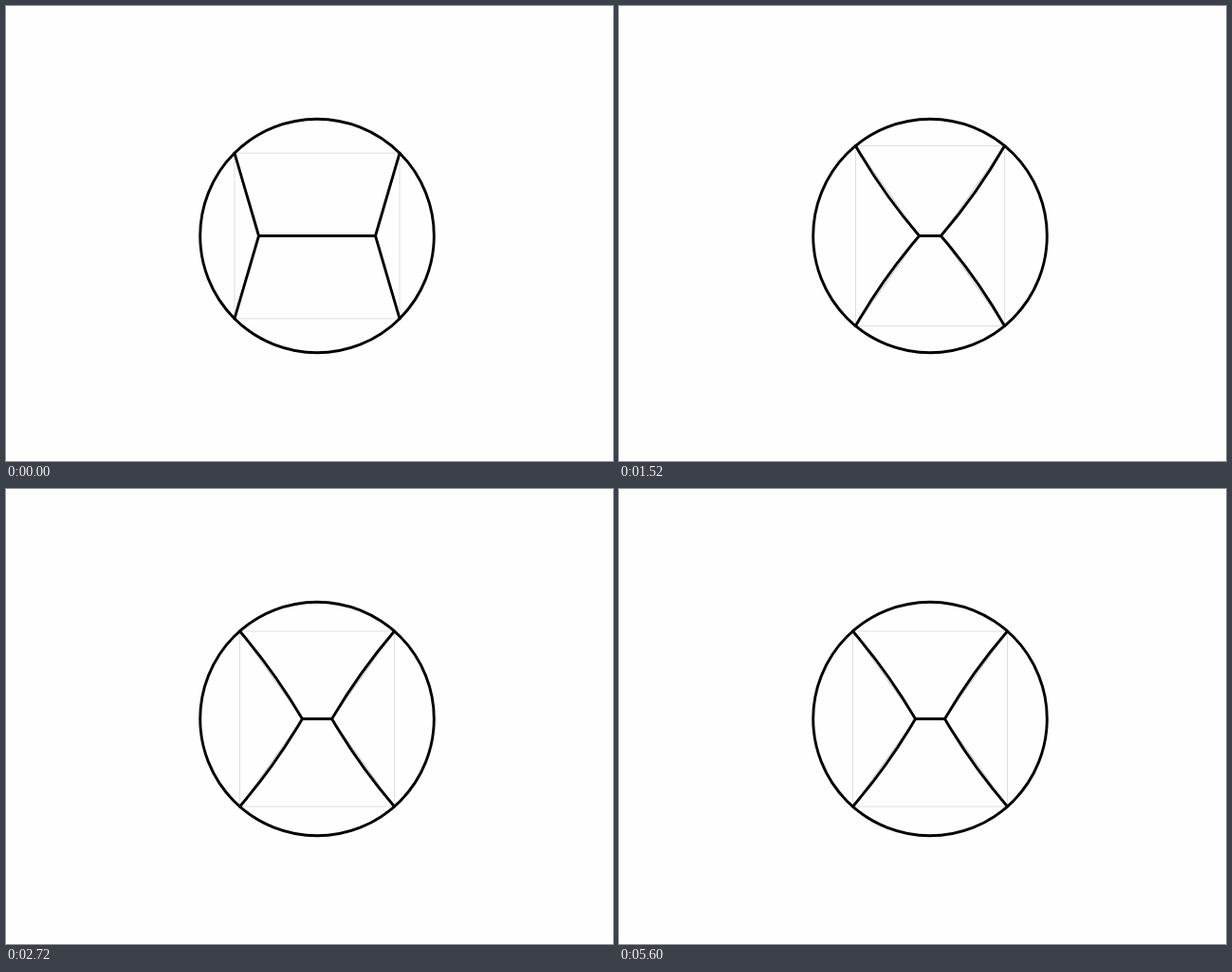
An HTML page for the animation above (10000 ms loop, 640x480 px).

```html
<!DOCTYPE html>
<html lang="en">
<head>
<meta charset="utf-8">
<title>Relaxing foam</title>
<style>
  html, body { margin: 0; width: 100%; height: 100%; overflow: hidden; background: #fefefe; }
  svg { display: block; width: 640px; height: 480px; }
  path, circle { fill: none; stroke: #000; stroke-width: 2.9; stroke-linecap: round; stroke-linejoin: round; }
  .guide { stroke-width: 1; stroke-opacity: .13; stroke-linecap: butt; }
  #chords { stroke-opacity: .24; }
</style>
</head>
<body>
<svg viewBox="0 0 640 480">
  <g transform="translate(328 242.5)">
    <path id="box" class="guide"/>
    <path id="chords" class="guide"/>
    <circle r="123.3"/>
    <path id="films"/>
  </g>
</svg>
<script>
const { sin, cos, abs, exp, max, floor, PI } = Math;
const RADIUS = 123.3, LOOP = 10000, START = 1000, STEP = 40, DAMPING = .13;
const SIGNS = [[-1, -1], [1, -1], [1, 1], [-1, 1]];

// The foam swings around its resting shape; every swing dies out at the same rate.
function poseAt(step) {
  const fade = exp(-DAMPING * step);
  const swing = (rate, a, b) => fade * (a * cos(rate * step) + b * sin(rate * step));
  return {
    half: 15.5 + swing(.31, 46, 9.2),
    angle: (48.6 + fade * (5.7 - 11 * cos(.34 * (step - 1.7)))) * PI / 180,
    bend: .0016 + swing(.375, -.0016, .0223)
  };
}

function setPath(id, d) {
  document.getElementById(id).setAttribute('d', d);
}

function draw(step) {
  const { half, angle, bend } = poseAt(step);
  const w = RADIUS * cos(angle), h = RADIUS * sin(angle);
  const r = 1 / max(abs(bend), 1e-5);

  const corner = ([sx, sy]) => `M${sx * w} ${sy * h}`;
  const chord = s => `${corner(s)}L${s[0] * half} 0`;
  const film = s => {
    const sweep = bend * s[0] * s[1] > 0 ? 1 : 0;
    return `${corner(s)}A${r} ${r} 0 0 ${sweep} ${s[0] * half} 0`;
  };

  setPath('box', `M${-w} ${-h}H${w}V${h}H${-w}Z`);
  setPath('chords', SIGNS.map(chord).join(''));
  setPath('films', SIGNS.map(film).join('') + `M${-half} 0H${half}`);
}

function tick() {
  const t = performance.now() % LOOP;
  draw(t < START ? 0 : floor((t - START) / STEP) + 1);
  requestAnimationFrame(tick);
}
tick();
</script>
</body>
</html>
```
